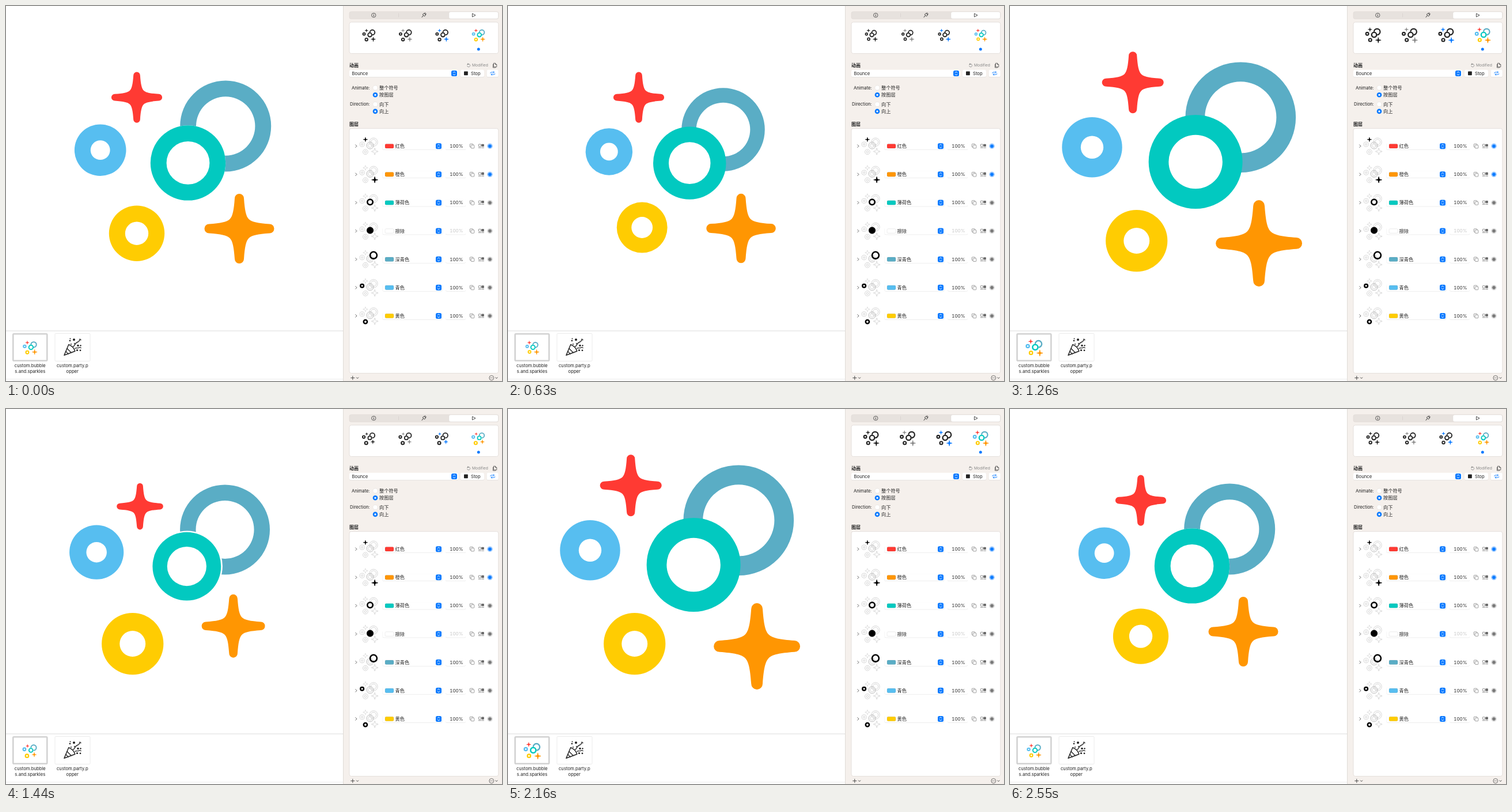
An HTML page for the animation above (2640 ms loop, 861 by 651 pixels).

```html
<!DOCTYPE html>
<html lang="zh">
<head>
<meta charset="utf-8">
<title>Symbol bounce</title>
<style>
html, body { margin: 0; width: 100%; height: 100%; overflow: hidden; background: #fff; }
svg { display: block; width: 861px; height: 651px; }
text { font: 7.7px Inter, "Noto Sans CJK SC", "Noto Sans CJK", sans-serif; fill: #222; white-space: pre; }
.zh { font: 8.2px "Noto Sans CJK SC", "Noto Sans CJK", sans-serif; }
.bold { font-weight: 700; font-size: 8px; }
.num { font-size: 7.9px; font-feature-settings: "tnum"; }
.line { fill: none; stroke-linecap: round; stroke-linejoin: round; }
</style>
</head>
<body>
<svg id="stage" viewBox="0 0 861 651" xmlns="http://www.w3.org/2000/svg"></svg>
<script>
const CX = 291.5, CY = 280;
const BLUE = '#0a7aff', INK = '#222', GREY = '#8a8a8a';
const STAR = 'M-8-52.5A8 8 0 0 1 8-52.5C9.5-32 11.5-21.5 16.5-16.5' +
  'C21.5-11.5 32-9.5 52.5-8A8 8 0 0 1 52.5 8C32 9.5 21.5 11.5 16.5 16.5' +
  'C11.5 21.5 9.5 32 8 52.5A8 8 0 0 1-8 52.5C-9.5 32-11.5 21.5-16.5 16.5' +
  'C-21.5 11.5-32 9.5-52.5 8A8 8 0 0 1-52.5-8C-32-9.5-21.5-11.5-16.5-16.5C-11.5-21.5-9.5-32-8-52.5Z';

// In order of the bounce: each layer starts a little after the one above it.
const LAYERS = [
  { name: '红色', color: '#ff3a33', x: 227, y: 158.7, star: 0.729 },
  { name: '橙色', color: '#ff9602', x: 405, y: 386.5, star: 1 },
  { name: '薄荷色', color: '#02c9c0', x: 316, y: 272.4, r: 65.2, hole: 37.4 },
  { name: '擦除', color: '#fff', x: 316, y: 272.4, r: 65.2, hole: 0 },
  { name: '深青色', color: '#5aadc5', x: 381.2, y: 208.5, r: 79, hole: 51.2 },
  { name: '青色', color: '#57bef0', x: 163.7, y: 250.2, r: 44.8, hole: 16.9 },
  { name: '黄色', color: '#ffcc02', x: 227, y: 394.7, r: 48.2, hole: 20.2 }
];
const PAINT = [4, 3, 2, 5, 6, 0, 1];

const box = (x, y, w, h, r, fill, extra = '') =>
  `<rect x="${x}" y="${y}" width="${w}" height="${h}" rx="${r}" fill="${fill}" ${extra}/>`;
const dot = (x, y, r, fill, extra = '') => `<circle cx="${x}" cy="${y}" r="${r}" fill="${fill}" ${extra}/>`;
const line = (d, color = INK, w = 0.8) => `<path class="line" d="${d}" stroke="${color}" stroke-width="${w}"/>`;
const label = (x, y, s, cls = '', extra = '') => `<text x="${x}" y="${y}" class="${cls}" ${extra}>${s}</text>`;
const at = (x, y, body) => `<g transform="translate(${x} ${y})">${body}</g>`;
const field = (x, y, w, h = 12.4) =>
  box(x, y + 0.5, w, h, 2.5, '#000', 'opacity=".13"') + box(x, y, w, h, 2.5, '#fff');

function shape(l, style) {
  if (l.star) return `<path d="${STAR}" transform="translate(${l.x} ${l.y}) scale(${l.star})" ${style}/>`;
  const ring = r => `M${l.x - r} ${l.y}a${r} ${r} 0 1 0 ${2 * r} 0a${r} ${r} 0 1 0 ${-2 * r} 0Z`;
  return `<path fill-rule="evenodd" d="${ring(l.r)}${l.hole ? ring(l.hole) : ''}" ${style}/>`;
}

const place = (x, y, f, body) =>
  `<g transform="translate(${x} ${y}) scale(${f}) translate(${-CX} ${-CY})">${body}</g>`;

function symbol(x, y, f, rings, stars) {
  return place(x, y, f, PAINT.map(k => {
    const l = LAYERS[k];
    const c = k === 3 ? '#fff' : (l.star ? stars : rings) || l.color;
    return `<g data-k="${k}">${shape(l, `fill="${c}"`)}</g>`;
  }).join(''));
}

function preview(y, on) {
  const outline = LAYERS.map((l, k) => k === on ? '' :
    shape(l, 'fill="none" stroke="#b4b4b4" stroke-width="6"')).join('');
  return place(629.8, y - 0.4, 0.0913, outline + shape(LAYERS[on], 'fill="#000"'));
}

const stepper = (x, y) => box(x - 5, y - 5, 10, 10, 2.5, BLUE) +
  line(`M${x - 1.8} ${y - 1.3}l1.8-1.8l1.8 1.8M${x - 1.8} ${y + 1.3}l1.8 1.8l1.8-1.8`, '#fff', 0.9);

const radio = (y, on) => on
  ? dot(641, y, 4.3, BLUE) + dot(641, y, 1.6, '#fff')
  : dot(641, y, 4.1, '#fff', 'stroke="#dfd9d5" stroke-width=".5"');

function sun(x, y, c) {
  let rays = '';
  for (let i = 0; i < 12; i++) {
    const a = i * Math.PI / 6, u = Math.cos(a), v = Math.sin(a);
    rays += `M${x + 3.4 * u} ${y + 3.4 * v}L${x + 4.1 * u} ${y + 4.1 * v}`;
  }
  return dot(x, y, 2.8, c) + line(rays, c, 0.8);
}

function row(l, i) {
  const y = 243.2 + 49.13 * i, erase = i === 3;
  return line(`M606.7 ${y - 2.3}l2.3 2.3l-2.3 2.3`, '#555', 0.9) + preview(y, i) +
    field(653.5, y - 6.2, 104) +
    box(658, y - 3.8, 15, 7.6, 1.8, l.color, `stroke="${erase ? '#d8d8d8' : 'rgba(0,0,0,.15)'}" stroke-width=".5"`) +
    label(675.5, y + 3, l.name, 'zh') + stepper(751, y) +
    field(763, y - 6.2, 35) +
    label(770.3, y + 2.9, '100%', 'num', erase ? 'style="fill:#c4c4c4"' : '') +
    at(809, y, box(-3.8, -3.8, 5.6, 5.6, 1, 'none', 'stroke="#777" stroke-width=".7"') +
      box(-1.8, -1.8, 5.6, 5.6, 1, '#fff', 'stroke="#777" stroke-width=".7"')) +
    at(825, y, box(-4.7, -3.2, 4.2, 3.8, 0.6, 'none', 'stroke="#666" stroke-width=".7"') +
      box(0.4, -3.5, 4.4, 4.4, 0.6, '#666') + line('M-4.7 2.8H-.6M.8 2.8H4.5', '#666', 0.8)) +
    (i < 2 ? dot(840, y, 4.8, BLUE, 'opacity=".18"') : '') + sun(840, y, i < 2 ? BLUE : '#777');
}

function popper() {
  const specks = [[118, 579.3, 2], [111, 581, 1.3], [113, 587, 1], [125, 589.5, 1.7], [129.5, 589.5, 1.2],
    [123.5, 597.5, 1.6], [129, 597.8, 1.4], [119, 586, 1], [129.5, 579.5, 1.1], [111.5, 577.5, 0.9]];
  return line('M101 606.2L108.8 587.8C113.5 589.5 118 594 119.8 599.2Z', INK, 1.5) +
    line('M106 594.5l7.2 7.3M103.8 599.5l4.4 4.6', INK, 1.3) +
    line('M116.5 591.5C120 589 120 584.5 124 583.5S127.5 580 128.3 578', INK, 1.3) +
    line('M120 594.5c2.3-2.2 4.2.2 6.2-1.2s2.4-.8 4 .2', INK, 1.2) +
    specks.map(s => dot(s[0], s[1], s[2], INK)).join('');
}

const mid = 'text-anchor="middle"', end = 'text-anchor="end"';
const EDGE = 'stroke="#e0dad6" stroke-width=".8"';

document.getElementById('stage').innerHTML = [
  box(0, 0, 861, 651, 0, '#fff'),
  symbol(CX, CY, 1),
  // shelf
  box(0, 563.5, 585, 1, 0, '#dcdcdc'), box(0, 647.5, 585, 0.8, 0, '#e6e6e6'),
  box(12.3, 569.3, 59, 46.4, 1.5, '#fff', 'stroke="#d2d2d2" stroke-width="2.6"'),
  symbol(41.6, 593, 0.072),
  box(85, 568.5, 61, 48, 1.5, '#fff', 'stroke="#e6e6e6" stroke-width=".8"'),
  popper(),
  label(41.8, 627.2, 'custom.bubble', '', mid), label(41.8, 637, 's.and.sparkles', '', mid),
  label(115.3, 627.2, 'custom.party.p', '', mid), label(115.3, 637, 'opper', '', mid),
  // sidebar
  box(585.5, 0, 275.5, 651, 0, '#f5f0ec'), box(585.2, 0, 0.8, 651, 0, '#d9d4d0'),
  box(596, 9.7, 259, 12.8, 3.2, '#e7e2de', 'stroke="#dcd6d2" stroke-width=".5"'),
  box(681, 12.5, 0.6, 7, 0, '#d2ccc8'),
  box(768.8, 10, 85.8, 12.2, 3, '#fff', 'stroke="#d9d3cf" stroke-width=".5"'),
  dot(638.3, 16, 3.7, 'none', 'stroke="#333" stroke-width=".75"'),
  line('M638.3 15.6v2.2', '#333', 0.9), dot(638.3, 14, 0.55, '#333'),
  line('M722 19.5l2.2-2.8M723.5 15.2l3 2.6l2.2-2.4l-2.8-2.6ZM726.3 13l1.2-1l1.7 1.6l-.9 1.4', '#333', 1),
  line('M809.8 13.2L815 16L809.8 18.8Z', '#333', 0.85),
  box(596, 28, 258.8, 54.5, 3.5, '#fff', EDGE),
  symbol(630, 50.6, 0.0663, INK, INK),
  symbol(693.4, 50.6, 0.0663, INK, GREY),
  symbol(756.8, 50.6, 0.0663, INK, BLUE),
  symbol(820.1, 50.6, 0.0663),
  dot(820.3, 75, 2.5, BLUE),
  label(596, 106.2, '动画', 'zh bold'),
  line('M801 101.6A2.6 2.6 0 1 1 800.6 104.2M801 101.6l2.1-.3M801 101.6l.8-1.9', '#777', 0.75),
  label(809, 105.4, 'Modified', '', 'style="font-size:6.7px;fill:#888"'),
  line('M846.8 99.3h2.5l2.5 2.5v4h-5ZM849.3 99.3v2.5h2.5M846.6 101.2h-1.2v5.8h4.4v-1', '#444', 0.75),
  field(596, 110.8, 189), label(600.6, 119.6, 'Bounce'), stepper(778, 117),
  field(789, 110.8, 41), box(795, 113.5, 6.8, 6.8, 0.8, INK), label(807, 119.6, 'Stop'),
  field(834.5, 110.8, 20.3),
  line('M841 116.5v-.3q0-1.2 1.2-1.2h5.2M846 113.5l1.5 1.5l-1.5 1.5M848.6 117.4v.3q0 1.2-1.2 1.2h-5.2M843.6 117.4l-1.5 1.5l1.5 1.5', BLUE, 0.9),
  label(631.8, 144.7, 'Animate:', '', end), label(631.8, 173.2, 'Direction:', '', end),
  radio(142, false), radio(154.3, true), radio(170.6, false), radio(182.9, true),
  label(648, 145, '整个符号', 'zh'), label(648, 157.3, '按图层', 'zh'),
  label(648, 173.6, '向下', 'zh'), label(648, 185.9, '向上', 'zh'),
  label(596, 207.8, '图层', 'zh bold'),
  box(596, 212.5, 258.8, 425, 3.5, '#fff', EDGE),
  LAYERS.map(row).join(''),
  line('M598.7 645.6h6.2M601.8 642.5v6.2', '#333', 0.85),
  line('M608.4 644.9l1.7 1.7l1.7-1.7M849.7 644.9l1.7 1.7l1.7-1.7', '#333', 0.9),
  dot(842.8, 645.6, 4, 'none', 'stroke="#444" stroke-width=".75"'),
  [-1.8, 0, 1.8].map(d => dot(842.8 + d, 645.6, 0.55, '#444')).join('')
].join('');

// Growth beyond full size, one value per GAP ms.
const LOOP = 2640, FRAME = 30, HOLD = 120, PERIOD = 900, GAP = 22.5, FIRST = 15;
const CURVE = [0, .003, .023, .062, .1125, .166, .213, .24, .25, .239, .214, .167, .1125, .051, -.013,
  -.059, -.0885, -.0915, -.0855, -.063, -.03, -.004, 0];
const key = i => CURVE[i] || 0;

function growth(v) {
  const p = (v - FIRST) / GAP, i = Math.floor(p), f = p - i;
  if (p <= 0 || i >= CURVE.length) return 0;
  const a = key(i), b = key(i + 1), m = (b - key(i - 1)) / 2, n = (key(i + 2) - a) / 2;
  return a + f * (m + f * (3 * (b - a) - 2 * m - n + f * (2 * (a - b) + m + n)));
}

const parts = [...document.querySelectorAll('[data-k]')].map(el => ({ el, k: +el.dataset.k }));

function draw(ms) {
  const t = Math.floor((ms % LOOP + 0.01) / FRAME) * FRAME;
  const u = t < HOLD ? 0 : (t - HOLD) % PERIOD;
  const scales = LAYERS.map((l, k) => 1 + growth(u - k * GAP));
  for (const { el, k } of parts) {
    const s = scales[k];
    el.setAttribute('transform', `translate(${CX * (1 - s)} ${CY * (1 - s)}) scale(${s})`);
  }
}

const start = performance.now();
function tick() {
  draw(Math.max(0, performance.now() - start));
  requestAnimationFrame(tick);
}
tick();
</script>
</body>
</html>
```
